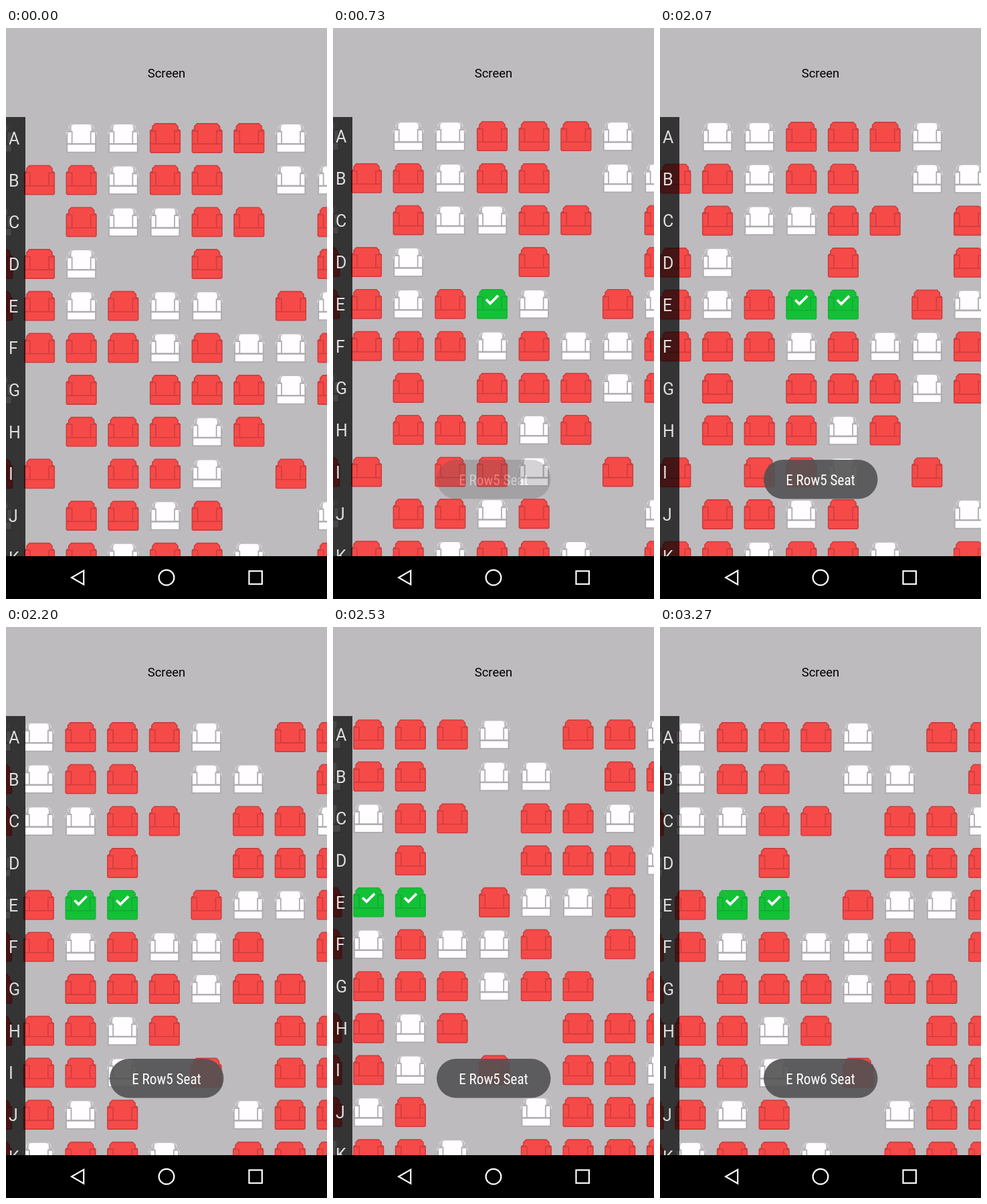
These frames come from a looping animation (480x853 px, 3.34 s). An HTML page:

```html
<!DOCTYPE html>
<html lang="en">
<head>
<meta charset="utf-8">
<title>Seat picker</title>
<style>
html, body { margin: 0; width: 100%; height: 100%; overflow: hidden; background: #bdbbbe; }
svg { display: block; width: 100vw; height: 100vh; }
text { font-family: Roboto, "Noto Sans", sans-serif; }
.toast text { font-family: "Roboto Condensed", Roboto, sans-serif; font-stretch: 87.5%; }
</style>
</head>
<body>
<svg viewBox="0 0 480 853" preserveAspectRatio="none">
  <defs>
    <path id="body" d="M-19 -12.5V-17.5L-15 -21.7H15L19 -17.5V-12.5H21L22.3 -11V20.2L21 21.5H-21L-22.3 20.2V-11L-21 -12.5Z"/>
    <path id="seams" d="M-22 -11H-14V7.5M22 -11H14V7.5M-22 8.5H22"/>
    <g id="R" fill="#f64a49" stroke="#cd3d3d" stroke-width="1.6" stroke-linejoin="round">
      <use href="#body"/><use href="#seams" fill="none"/>
    </g>
    <g id="G" stroke-linejoin="round">
      <use href="#body" fill="#13c136" stroke="#12b333" stroke-width="1.4"/>
      <use href="#seams" fill="none" stroke="#16a037" stroke-width="1.2"/>
      <path d="M-9 -7L-3 -1L9 -13" fill="none" stroke="#fff" stroke-width="3.8" stroke-linejoin="miter"/>
    </g>
    <g id="W" stroke-linejoin="round">
      <path d="M-15 7.5V-16Q-15 -20.5 -10.5 -20.5H10.5Q15 -20.5 15 -16V7.5Z" fill="#fffdff"/>
      <path d="M-20.5 -9H-14V7.5H-20.5ZM14 -9H20.5V7.5H14ZM-20.5 10H20.5V20.3H-20.5Z" fill="#fffdff"/>
      <path d="M-21.5 -10H-14V8.5M21.5 -10H14V8.5M-21.5 8.5H21.5M-21.5 -10V21H21.5V-10" fill="none" stroke="#aeacaf" stroke-width="1.8"/>
      <path d="M-18.5 -14V-17L-14 -21.5M18.5 -14V-17L14 -21.5M-22.5 -5V-9L-20 -11.5M22.5 -5V-9L20 -11.5" fill="none" stroke="#e9e7ea" stroke-width="1"/>
    </g>
  </defs>
  <rect width="480" height="853" fill="#bdbbbe"/>
  <g id="seats"></g>
  <rect y="133" width="29" height="656" fill="#000" fill-opacity=".72"/>
  <g id="letters" font-size="25" fill="#dedede"></g>
  <text x="240" y="73.6" font-size="18.5" text-anchor="middle">Screen</text>
  <g class="toast" id="toast">
    <rect x="155" y="645" width="170.5" height="58.5" rx="29.2" fill="#535253" fill-opacity=".9"/>
    <text id="label" x="240" y="682.5" font-size="21.2" fill="#fff" text-anchor="middle"></text>
  </g>
  <rect y="789" width="480" height="64" fill="#000"/>
  <g fill="none" stroke="#fff" stroke-width="2.2">
    <path d="M98.2 821L116.2 810.6V831.4Z"/>
    <circle cx="240" cy="821" r="11.4"/>
    <rect x="363.5" y="811.3" width="19.4" height="19.4"/>
  </g>
</svg>
<script>
const NS = "http://www.w3.org/2000/svg";
const LOOP = 3340, STEP = 200 / 3, PITCH = 62.67;
const $ = id => document.getElementById(id);

// One string per row: R sold, W free, . gap
const ROWS = [
  "W.WWRRRW.RRW", ".RRWRR.WW.RR", "W.RWWRR.RRW.", "RRW..R..RRRW",
  "RRWRWW.RWWR.", ".RRRWRWWR.R.", "W.R.RRRWRR.R", "..RRRWR..RRR",
  "RR.RRW.R.RRW", "W.RRWR..WRRR", ".RRWRRW.RRRR"
];

function add(parent, tag, attrs) {
  const el = document.createElementNS(NS, tag);
  for (const k in attrs) el.setAttribute(k, attrs[k]);
  return parent.appendChild(el);
}

const seats = {};
ROWS.forEach((row, r) => {
  [...row].forEach((kind, c) => {
    if (kind === ".") return;
    const x = -12.67 + c * PITCH, y = 164.6 + r * PITCH;
    seats[r + "," + c] = add($("seats"), "use", { href: "#" + kind, transform: `translate(${x} ${y})` });
  });
  add($("letters"), "text", { x: 4, y: 174 + r * PITCH }).textContent = String.fromCharCode(65 + r);
});

// Drag path: time, x, y
const DRAG = [
  [470, 0, 0], [670, 0, -2.8], [2000, 0, -2.8], [2070, -28, -2], [2133, -80, -1],
  [2200, -126.5, 0], [2267, -163, -2], [2333, -187, -3.8], [2400, -199.5, -4.8], [2410, -200, -5]
];
const RELEASE = 2410, SETTLE = 400, REST = -130;
const clamp = v => Math.max(0, Math.min(1, v));
const mix = (a, b, p) => a + (b - a) * p;

function offset(t) {
  const last = DRAG[DRAG.length - 1];
  if (t >= RELEASE) {
    const p = (1 - Math.cos(Math.PI * clamp((t - RELEASE) / SETTLE))) / 2;
    return [mix(last[1], REST, p), mix(last[2], 0, p)];
  }
  const i = DRAG.findIndex(k => t < k[0]);
  if (i === 0) return [0, 0];
  const a = DRAG[i - 1], b = DRAG[i], p = (t - a[0]) / (b[0] - a[0]);
  return [mix(a[1], b[1], p), mix(a[2], b[2], p)];
}

function render(time) {
  // The screen refreshes 15 times a second
  const t = Math.floor((time % LOOP + 4) / STEP) * STEP;
  const [x, y] = offset(t);
  $("seats").setAttribute("transform", `translate(${x} ${y})`);
  $("letters").setAttribute("transform", `translate(0 ${y})`);
  seats["4,4"].setAttribute("href", t > 660 ? "#G" : "#W");
  seats["4,5"].setAttribute("href", t > 1130 ? "#G" : "#W");
  $("toast").setAttribute("opacity", clamp((t - 680) / 200));
  $("label").textContent = `E Row${t > 3190 ? 6 : 5} Seat`;
}

const start = performance.now();
function tick() {
  render(performance.now() - start);
  requestAnimationFrame(tick);
}
tick();
</script>
</body>
</html>
```
